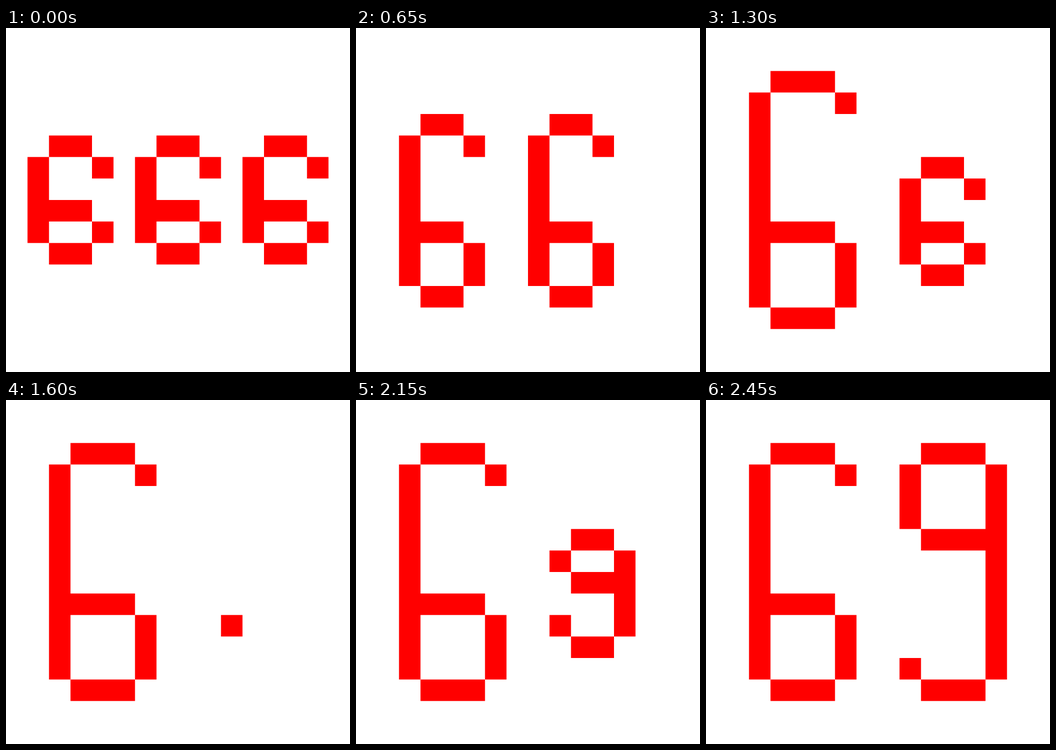
An HTML page for the animation above (3.2 s loop, 748 by 748 pixels).

```html
<!DOCTYPE html>
<html lang="en">
<head>
<meta charset="utf-8">
<title>Pixel digits</title>
<style>
  html, body { margin: 0; width: 100%; height: 100%; overflow: hidden; background: #fff; }
  svg { display: block; width: 100%; height: 100%; }
</style>
</head>
<body>
<svg viewBox="0 0 16 16"><path id="ink" fill="#f00"/></svg>
<script>
const LOOP = 3200;
const ink = document.getElementById('ink');

const box = (x, y, w, h) => w > 0 && h > 0 ? `M${x} ${y}h${w}v${h}h${-w}z` : '';

function six(x, y, w, h) {
  const low = Math.max(1, Math.floor((h - 3) / 3));
  const bar = y + h - 2 - low;
  const right = x + w - 1;
  return box(x + 1, y, w - 2, 1) +
    box(x, y + 1, 1, h - 2) +
    box(right, y + 1, 1, 1) +
    box(x, bar, w - 1, 1) +
    box(right, bar + 1, 1, low) +
    box(x + 1, y + h - 1, w - 2, 1);
}

function nine(x, y, w, h, inset) {
  const bowl = Math.min(3, Math.max(1, Math.floor((h - 3) / 2)));
  return box(x + 1, y, w - 2, 1) +
    box(x, y + 1, 1, bowl) +
    box(x + w - 1, y + 1, 1, h - 2) +
    box(x + 1, y + 1 + bowl, w - 1, 1) +
    box(x + inset, y + h - 2, 1, 1) +
    box(x + 1 + inset, y + h - 1, w - 2 - inset, 1);
}

// Step 0 is a dot, step 10 the full-height nine.
function growing(step) {
  if (step === 0) return box(10, 10, 1, 1);
  if (step === 1) return box(10, 9, 2, 2);
  const w = Math.min(5, 2 + Math.floor(step / 2));
  const h = step + 2;
  const x = step >= 6 && step <= 8 ? 8 : 9;
  const y = 11 + Math.floor(step * 0.3) - h;
  return nine(x, y, w, h, step === 6 || step === 7 ? 1 : 0);
}

const pair = six(1, 5, 4, 6) + six(6, 5, 4, 6);
const big = six(2, 2, 5, 12);

// [start in ms, path]
const poses = [];
for (let i = 0; i < 6; i++) {
  poses.push([i ? 100 + 50 * i : 0, pair + (i < 5 ? six(11 + i, 5, 4, 6) : '')]);
}
poses.push(
  [500, six(2, 4, 4, 7) + six(7, 4, 4, 7)],
  [650, six(2, 4, 4, 9) + six(8, 4, 4, 9)],
  [800, six(2, 3, 5, 11) + six(9, 3, 5, 11)],
  [1000, big + six(9, 2, 5, 12)],
  [1200, big + six(9, 4, 4, 9)],
  [1300, big + six(9, 6, 4, 6)],
  [1400, big + six(9, 7, 3, 5)],
  [1500, big + box(10, 9, 2, 2)],
  [1600, big + box(10, 10, 1, 1)],
  [1700, big]
);
for (let i = 0; i <= 10; i++) poses.push([1950 + 50 * i, big + growing(i)]);

let shown;
function draw(now) {
  const t = now % LOOP;
  const pose = poses.findLast(([start]) => start <= t);
  if (pose !== shown) {
    shown = pose;
    ink.setAttribute('d', pose[1]);
  }
}

function tick() {
  draw(performance.now());
  requestAnimationFrame(tick);
}
draw(0);
requestAnimationFrame(tick);
</script>
</body>
</html>
```
